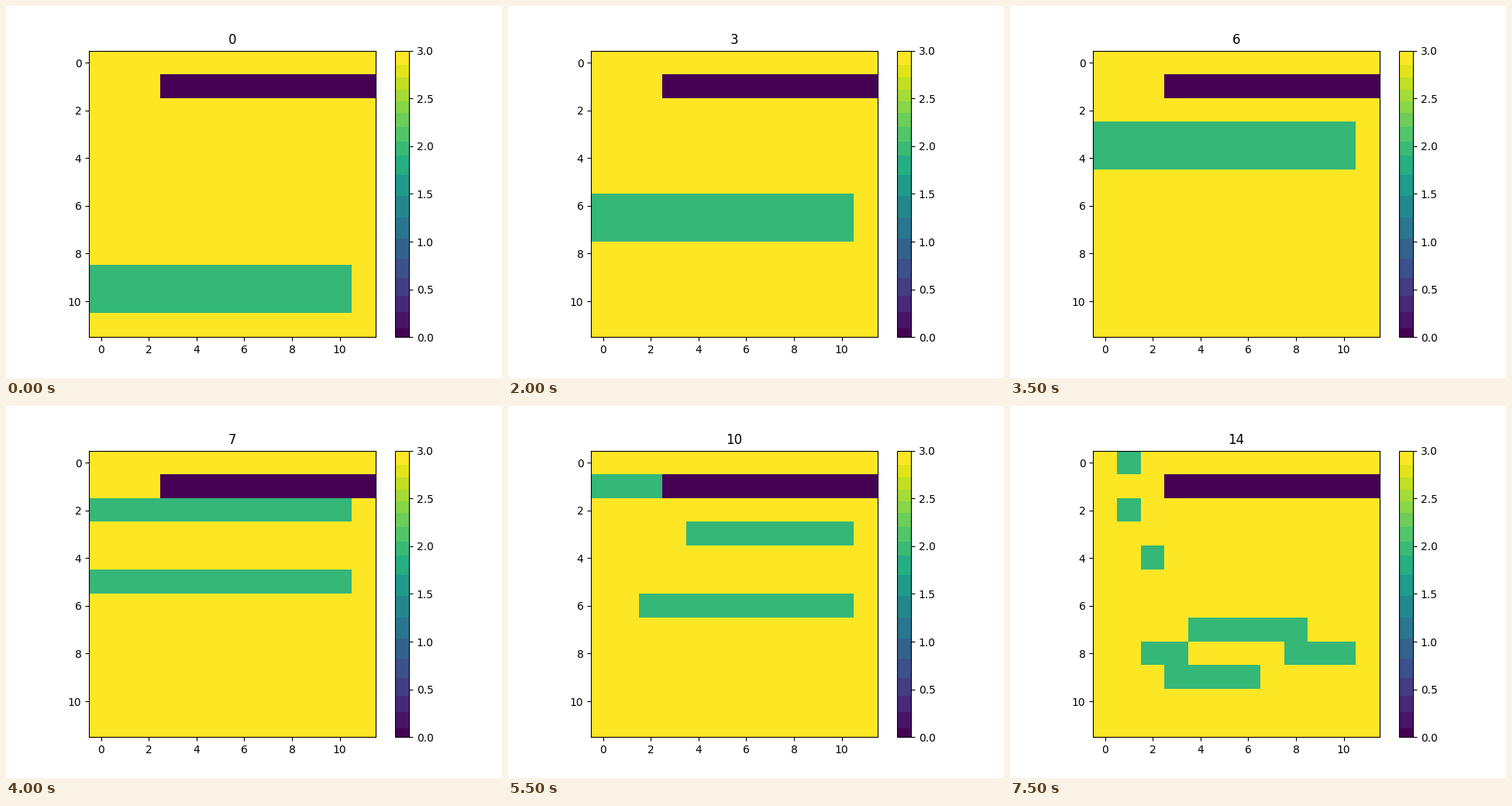
Animation, 640 px wide and 480 px high, one loop 8 s. Source, as a matplotlib script:

```python
import numpy as np
import matplotlib.pyplot as plt
from matplotlib.animation import FuncAnimation
from matplotlib.cm import ScalarMappable
from matplotlib.colors import ListedColormap, Normalize

SIZE = 12
WALL, PARTICLE, EMPTY = 0, 2, 3
FLOOR = 9    # lowest row the falling sheet reaches
SPLIT = 7    # step at which the two rows of the band part
PLUME = 12   # step at which particles gather at the wall's left end
LANDING = 13


def fill(grid, row, first, last, value=PARTICLE):
    grid[row, first:last + 1] = value


def draw_band(grid, step):
    """Two full rows climbing one row per step."""
    for row in (FLOOR - step, FLOOR + 1 - step):
        fill(grid, row, 0, 10)


def draw_sheets(grid, step):
    """Two sheets three rows apart: they bob under the wall, then fall."""
    top = max(2 + (step - SPLIT) % 2, step - SPLIT)
    fill(grid, top, min(4, step - 5), min(10, max(8, 20 - step)))

    bounce = max(0, step - LANDING)
    bottom = min(top + 3, FLOOR)
    fill(grid, bottom - bounce, min(2, max(0, step - 8)), 10)
    if bounce:
        # The middle of the sheet slides left instead of rebounding.
        fill(grid, bottom - bounce, 4, 7, EMPTY)
        fill(grid, bottom, 4 - bounce, 7 - bounce)


def draw_flap(grid, step):
    """The part that passes the wall, turns at the top and shrinks."""
    row = min(2, abs(9 - step))
    fill(grid, row, max(0, step - 13), min(2, 15 - step))
    if step >= PLUME:
        grid[:max(1, 14 - step), 8 - step // 2] = PARTICLE
        grid[step - 10, 2] = PARTICLE


def grid_at(step):
    grid = np.full((SIZE, SIZE), EMPTY)
    if step < SPLIT:
        draw_band(grid, step)
    else:
        draw_sheets(grid, step)
        draw_flap(grid, step)
    grid[1, 3:] = WALL
    return grid


def banded_viridis(bands=18):
    """Viridis in flat bands, narrower where its colour changes faster."""
    viridis = plt.get_cmap("viridis")
    level = np.linspace(0, 1, 256)
    change = np.linalg.norm(np.diff(viridis(level), axis=0), axis=1)
    pace = np.append(0, np.cumsum(np.sqrt(change)))
    pace /= pace[-1]
    band = np.clip(np.floor(pace * (bands - 0.3) + 0.4), 0, bands - 1)
    return ListedColormap(viridis(np.interp(band / (bands - 1), pace, level)))


plt.rcParams["font.family"] = "DejaVu Sans"
fig, ax = plt.subplots(figsize=(6.4, 4.8), dpi=100)
norm = Normalize(WALL, EMPTY)
image = ax.imshow(grid_at(0), cmap="viridis", norm=norm,
                  interpolation="nearest")
fig.colorbar(ScalarMappable(norm, banded_viridis()), ax=ax)
title = ax.set_title("0")


def update(frame):
    step = max(0, frame - 1)  # the first state is held twice as long
    image.set_data(grid_at(step))
    title.set_text(str(step))
    return image, title


anim = FuncAnimation(fig, update, frames=16, interval=500,
                     repeat=True, repeat_delay=0)
plt.show()
```
